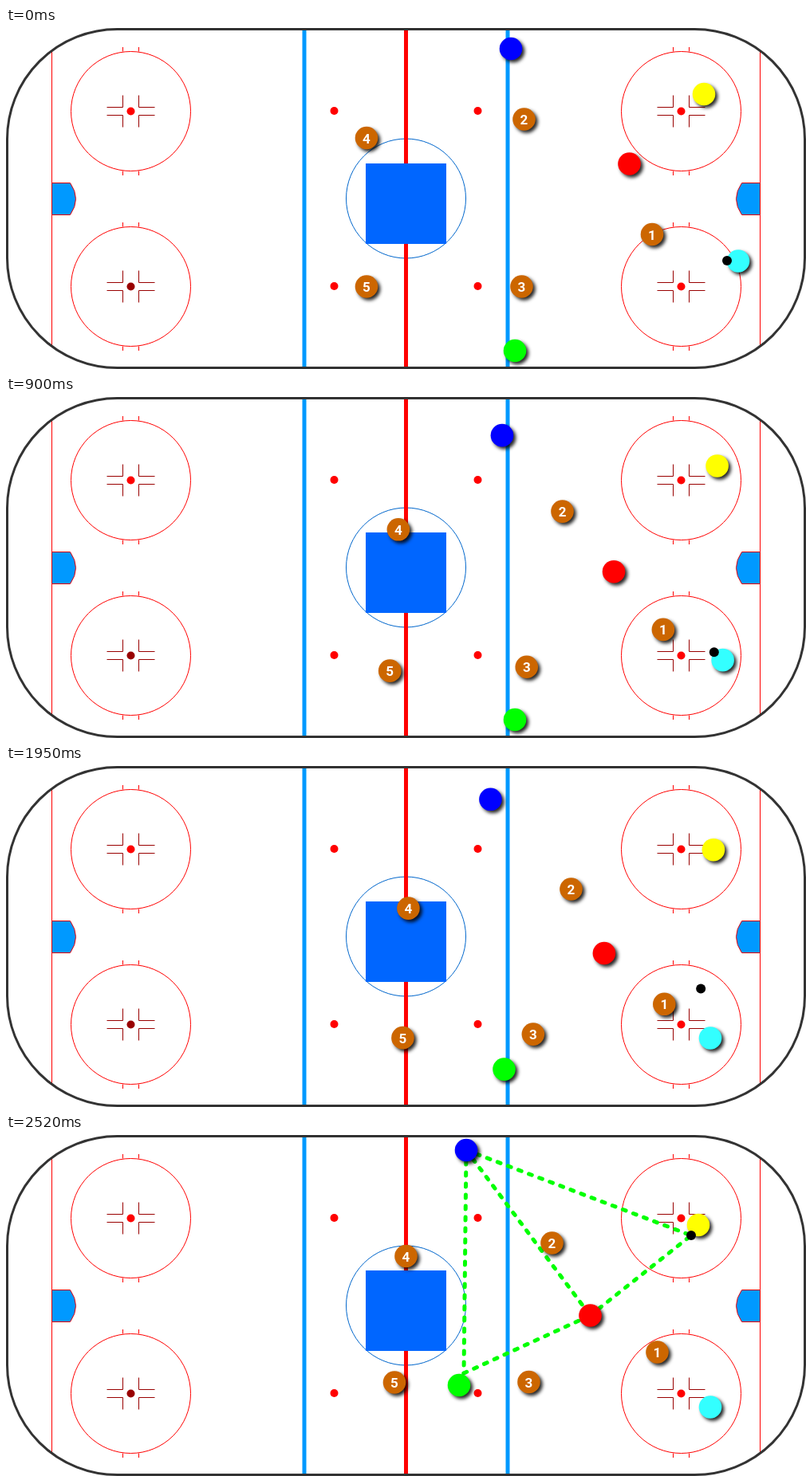
Animation of 1003x428 px, one loop 3.45 s. Source, as an HTML page with a canvas:

```html
<!DOCTYPE html>
<html lang="en">
<head>
<meta charset="utf-8">
<title>Hockey breakout drill</title>
<style>
  html, body { margin: 0; width: 100%; height: 100%; overflow: hidden; background: #fff; }
  canvas { display: block; }
</style>
</head>
<body>
<canvas id="stage" width="1003" height="428"></canvas>
<script>
const ctx = document.getElementById('stage').getContext('2d');
const FRAME_MS = 30, FRAMES = 115;
const FIRST_MOVE = 14, FIRST_STOP = 37, SECOND_MOVE = 59, SECOND_STOP = 84;
const RED = '#f00', GREEN = '#0f0', BLUE = '#09f', ORANGE = '#c60';
const CENTER_X = 501.5;

// A piece rests at three stops; each bend is the bulge of a leg relative to its length.
const piece = (color, stops, bends, label = '') => ({ color, stops, bends, label });
const opponent = (label, stops, bends) => piece(ORANGE, stops, bends, label);

const blue = piece('#00f', [[633, 26], [612, 54], [577, 19]], [-0.15, 0.15]);
const yellow = piece('#ff0', [[875, 83], [889, 97.5], [868, 113]], [-0.56, -0.26]);
const red = piece(RED, [[781.5, 170.5], [753.5, 240.5], [732.5, 226.5]], [0, 0.14]);
const green = piece(GREEN, [[638, 405], [638, 405], [568, 314]], [0, 0.05]);
const cyan = piece('#3ff', [[918, 292.5], [883, 341.5], [883, 341.5]], [-0.12, 0]);
const puck = piece('#000', [[904, 292], [875, 328], [859, 126]], [-0.13, 0]);
const discs = [
  blue, yellow, red, green, cyan,
  opponent('1', [[810, 259], [824, 308], [816.5, 272.5]], [-0.1, 0.12]),
  opponent('2', [[649.5, 114.5], [712.5, 164], [684.5, 135.5]], [-0.1, 0.13]),
  opponent('3', [[646.5, 324.5], [655.5, 345], [655.5, 310]], [0, 0.21]),
  opponent('4', [[452, 138], [501, 187], [501.5, 152]], [-0.14, 0.13]),
  opponent('5', [[452, 324.5], [494, 352], [487, 310.5]], [0, 0.17])
];

const progress = (frame, from, to) => Math.max(0, Math.min(1, (frame - from) / (to - from)));

function position({ stops, bends }, frame) {
  const leg = frame < SECOND_MOVE ? 0 : 1;
  const u = leg ? progress(frame, SECOND_MOVE, SECOND_STOP) : progress(frame, FIRST_MOVE, FIRST_STOP);
  const [x, y] = stops[leg];
  const dx = stops[leg + 1][0] - x, dy = stops[leg + 1][1] - y;
  const bulge = bends[leg] * 4 * u * (1 - u);
  return [x + dx * u - dy * bulge, y + dy * u + dx * bulge];
}

function line(color, width, ...points) {
  ctx.strokeStyle = color;
  ctx.lineWidth = width;
  ctx.beginPath();
  for (const [x, y] of points) ctx.lineTo(x, y);
  ctx.stroke();
}

function dot(x, y, radius, color) {
  ctx.fillStyle = color;
  ctx.beginPath();
  ctx.arc(x, y, radius, 0, 7);
  ctx.fill();
}

function ring(x, y, radius, color) {
  ctx.strokeStyle = color;
  ctx.lineWidth = 1;
  ctx.beginPath();
  ctx.arc(x, y, radius, 0, 7);
  ctx.stroke();
}

function faceoff(x, y, color) {
  ring(x, y, 75, RED);
  for (const sx of [-1, 1]) {
    for (const sy of [-1, 1]) {
      const px = x + sx * 10, py = y + sy * 5;
      line('#900', 1, [px + sx * 20, py], [px, py], [px, py + sy * 15]);
      line(RED, 1, [px, y + sy * 75], [px, y + sy * 80.5]);
    }
  }
  dot(x, y, 5, color);
}

function goal(x, side) {
  line(RED, 1, [x, 29], [x, 399]);
  ctx.beginPath();
  ctx.moveTo(x, 194.5);
  ctx.lineTo(x + side * 23, 194.5);
  ctx.quadraticCurveTo(x + side * 37, 214.5, x + side * 23, 234.5);
  ctx.lineTo(x, 234.5);
  ctx.closePath();
  ctx.fillStyle = BLUE;
  ctx.fill();
  ctx.stroke();
}

function drawRink() {
  ctx.fillStyle = '#fff';
  ctx.fillRect(0, 0, 1003, 428);
  for (const side of [-1, 1]) {
    goal(CENTER_X + side * 444, -side);
    for (const y of [104, 324]) {
      faceoff(CENTER_X + side * 345, y + 0.5, side < 0 && y > 300 ? '#900' : RED);
      dot(CENTER_X + side * 90, y, 5, RED);
    }
    line(BLUE, 5, [CENTER_X + side * 127.5, 2], [CENTER_X + side * 127.5, 426]);
  }
  ring(CENTER_X, 214, 75, '#06c');
  line(RED, 5, [CENTER_X, 2], [CENTER_X, 426]);
  ctx.fillStyle = '#06f';
  ctx.fillRect(451, 170, 101, 101);
  ctx.strokeStyle = '#333';
  ctx.lineWidth = 3;
  ctx.beginPath();
  ctx.roundRect(1.5, 1.5, 1000, 425, 138);
  ctx.stroke();
}

function drawPasses(frame) {
  const at = p => position(p, frame);
  ctx.save();
  ctx.lineCap = 'round';
  ctx.setLineDash([4, 10]);
  if (frame >= SECOND_STOP) {
    const nearGreen = [574, 299];
    line(GREEN, 5, at(blue), at(puck));
    line(GREEN, 5, at(blue), at(red));
    line(GREEN, 5, at(blue), nearGreen);
    line(GREEN, 5, nearGreen, at(red));
    line(GREEN, 5, at(red), at(puck));
  } else if (frame >= FIRST_STOP && frame < SECOND_MOVE) {
    line(RED, 5, at(blue), at(puck));
    line(RED, 5, at(red), at(puck));
    line(GREEN, 5, [667, 399], at(puck));
  }
  ctx.restore();
}

function drawDisc(disc, frame) {
  const [x, y] = position(disc, frame);
  ctx.save();
  ctx.shadowColor = 'rgba(0, 0, 0, 0.85)';
  ctx.shadowBlur = 4;
  ctx.shadowOffsetX = ctx.shadowOffsetY = 3;
  dot(x, y, 14.3, disc.color);
  ctx.restore();
  ctx.fillStyle = '#fff';
  ctx.fillText(disc.label, x, y + 6.5);
}

function draw(now) {
  const frame = Math.floor(now / FRAME_MS) % FRAMES;
  drawRink();
  drawPasses(frame);
  for (const disc of discs) drawDisc(disc, frame);
  dot(...position(puck, frame), 6, puck.color);
}

ctx.font = 'bold 17px Roboto, sans-serif';
ctx.textAlign = 'center';
let start;
function tick(now) {
  start ??= now;
  draw(now - start);
  requestAnimationFrame(tick);
}
draw(0);
requestAnimationFrame(tick);
</script>
</body>
</html>
```
